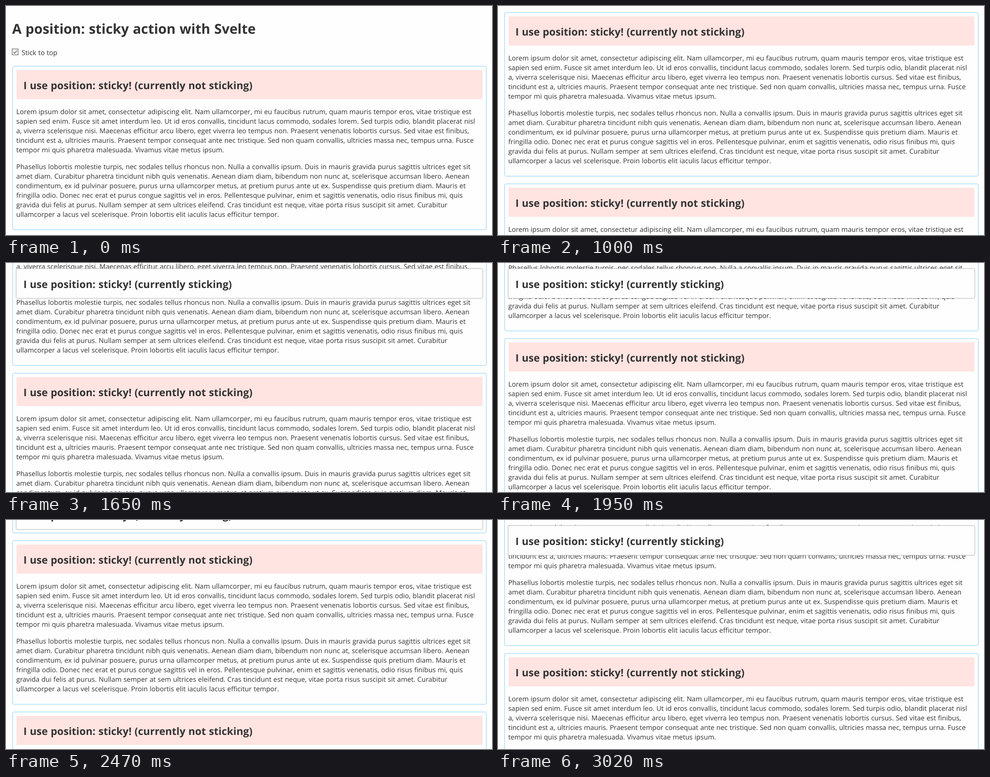
These frames come from a looping animation (1066 by 504 pixels, 3360 ms). An HTML page:

```html
<!DOCTYPE html>
<html lang="en">
<head>
<meta charset="utf-8">
<title>Sticky action</title>
<style>
  html, body { margin: 0; width: 100%; height: 100%; overflow: hidden; background: #fefefe; }
  svg { display: block; }
  text {
    font: 14.92px "Open Sans", "Noto Sans", sans-serif;
    word-spacing: .03em;
    fill: #333;
    white-space: pre;
    text-rendering: geometricPrecision;
  }
  .title { font-size: 29.92px; font-weight: 700; }
  .head text { font-size: 22.54px; font-weight: 700; }
  .line { fill: none; stroke: #444; }
  .box { fill: none; stroke: #87cefa; }
  .head rect { fill: #ffe4e1; }
  .head .card { fill: #fefefe; stroke: #c6c6c6; filter: drop-shadow(0 0 1px rgba(0, 0, 0, .25)); display: none; }
  .stuck .card { display: inline; }
  .stuck .plain { display: none; }
</style>
</head>
<body>
<svg width="1066" height="504" viewBox="0 0 1066 504">
  <g id="page">
    <text class="title" x="13.5" y="61">A position: sticky action with Svelte</text>
    <rect class="line" x="13.5" y="94.5" width="13" height="13"/>
    <path class="line" stroke-width="1.2" d="M16 101.2l2.9 3 5.4-6.2"/>
    <text x="34.3" y="108">Stick to top</text>
  </g>
</svg>
<script>
const paragraphs = [
  `Lorem ipsum dolor sit amet, consectetur adipiscing elit. Nam ullamcorper, mi eu faucibus rutrum, quam mauris tempor eros, vitae tristique est
sapien sed enim. Fusce sit amet interdum leo. Ut id eros convallis, tincidunt lacus commodo, sodales lorem. Sed turpis odio, blandit placerat nisl
a, viverra scelerisque nisi. Maecenas efficitur arcu libero, eget viverra leo tempus non. Praesent venenatis lobortis cursus. Sed vitae est finibus,
tincidunt est a, ultricies mauris. Praesent tempor consequat ante nec tristique. Sed non quam convallis, ultricies massa nec, tempus urna. Fusce
tempor mi quis pharetra malesuada. Vivamus vitae metus ipsum.`,
  `Phasellus lobortis molestie turpis, nec sodales tellus rhoncus non. Nulla a convallis ipsum. Duis in mauris gravida purus sagittis ultrices eget sit
amet diam. Curabitur pharetra tincidunt nibh quis venenatis. Aenean diam diam, bibendum non nunc at, scelerisque accumsan libero. Aenean
condimentum, ex id pulvinar posuere, purus urna ullamcorper metus, at pretium purus ante ut ex. Suspendisse quis pretium diam. Mauris et
fringilla odio. Donec nec erat et purus congue sagittis vel in eros. Pellentesque pulvinar, enim et sagittis venenatis, odio risus finibus mi, quis
gravida dui felis at purus. Nullam semper at sem ultrices eleifend. Cras tincidunt est neque, vitae porta risus suscipit sit amet. Curabitur
ullamcorper a lacus vel scelerisque. Proin lobortis elit iaculis lacus efficitur tempor.`
];
const LOOP = 3360, FIRST = 132, PITCH = 377, HEIGHT = 361, HEAD = 64, INSET = 9, STICK = 13;

// time in ms, scroll offset, repaints until the next key
const keys = [
  [264, 0, 8], [630, 32, 6], [1000, 118, 5], [1380, 207, 9],
  [1950, 343, 8], [2470, 464, 8], [3020, 593, 1]
];

const page = document.getElementById('page');

function bodyText() {
  let y = 238 - FIRST, out = '';
  for (const p of paragraphs) {
    for (const line of p.split('\n')) {
      out += `<text x="22.5" y="${y}">${line}</text>`;
      y += 21;
    }
    y += 16;
  }
  return out;
}

function addBox(i) {
  const top = FIRST + i * PITCH;
  page.insertAdjacentHTML('beforeend', `<g transform="translate(0 ${top})">
    <rect class="box" x="14.5" y=".5" width="1039" height="${HEIGHT - 1}" rx="3.5"/>
    ${bodyText()}
    <g class="head">
      <rect class="plain" x="23" width="1022" height="${HEAD}"/>
      <rect class="card" x="22.5" y="-.5" width="1023" height="${HEAD + 1}" rx="2"/>
      <text x="38.2" y="42"></text>
    </g></g>`);
  const head = page.lastElementChild.querySelector('.head');
  return { top, head, label: head.querySelector('text') };
}

const boxes = [0, 1, 2].map(addBox);

function scrollAt(t) {
  const i = keys.findLastIndex(k => k[0] <= t);
  if (i < 0) return 0;
  const [start, from, steps] = keys[i];
  if (i === keys.length - 1) return from;
  const [end, to] = keys[i + 1];
  let u = Math.floor((t - start) / (end - start) * steps + 1e-6) / steps;
  if (i === 0) u *= u; // speeds up from rest
  return Math.round(from + (to - from) * u);
}

function draw(t) {
  const scroll = scrollAt(t);
  page.setAttribute('transform', `translate(0 ${-scroll})`);
  for (const { top, head, label } of boxes) {
    const stuck = top + INSET - scroll < STICK;
    const y = Math.min(Math.max(INSET, STICK + scroll - top), HEIGHT - INSET - HEAD);
    head.setAttribute('transform', `translate(0 ${y})`);
    head.classList.toggle('stuck', stuck);
    label.textContent = `I use position: sticky! (currently ${stuck ? '' : 'not '}sticking)`;
  }
}

const begin = performance.now();
function tick() {
  draw((performance.now() - begin) % LOOP);
  requestAnimationFrame(tick);
}
tick();
</script>
</body>
</html>
```
